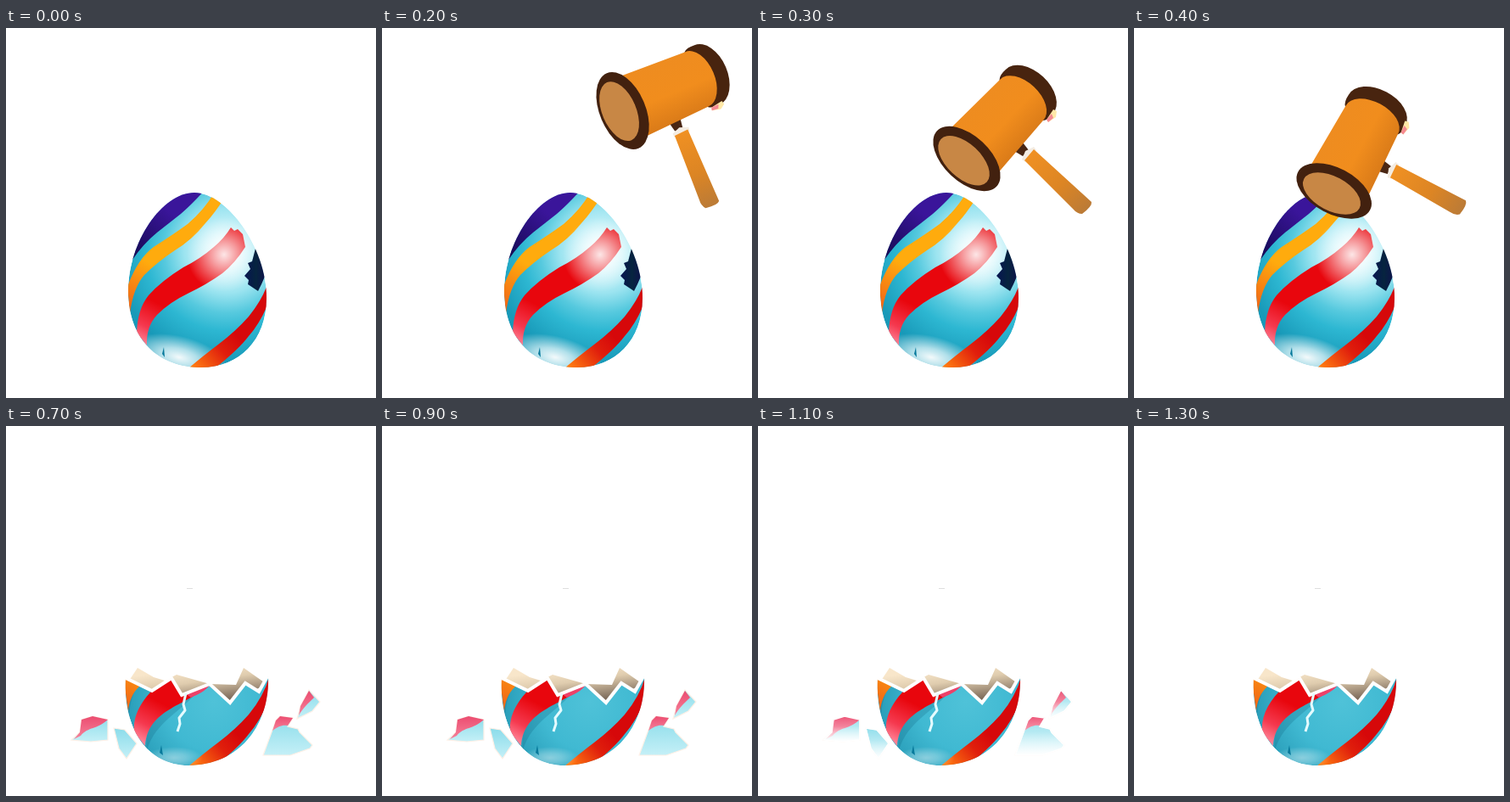
These frames come from a looping animation (436 px wide and 436 px high, 3.3 s). An HTML page:

```html
<!DOCTYPE html>
<html lang="en">
<head>
<meta charset="utf-8">
<title>Cracking egg</title>
<style>
html, body { margin: 0; width: 100%; height: 100%; overflow: hidden; background: #fff; }
svg { display: block; width: 100%; height: 100%; }
</style>
</head>
<body>
<svg viewBox="0 0 436 436">
<defs>
  <radialGradient id="aqua" gradientUnits="userSpaceOnUse" cx="260" cy="262" r="132">
    <stop offset="0" stop-color="#fff"/><stop offset=".18" stop-color="#cff4fa"/>
    <stop offset=".38" stop-color="#9ce4f0"/><stop offset=".56" stop-color="#56c9de"/>
    <stop offset=".72" stop-color="#2db7d2"/><stop offset="1" stop-color="#1899b8"/>
  </radialGradient>
  <radialGradient id="bowlAqua" gradientUnits="userSpaceOnUse" cx="245" cy="325" r="115">
    <stop offset="0" stop-color="#4fc2d8"/><stop offset=".5" stop-color="#40b9d2"/><stop offset="1" stop-color="#2396b2"/>
  </radialGradient>
  <radialGradient id="shine" gradientUnits="userSpaceOnUse" cx="257" cy="267" r="44">
    <stop offset="0" stop-color="#fff" stop-opacity=".9"/><stop offset=".35" stop-color="#fff" stop-opacity=".6"/>
    <stop offset="1" stop-color="#fff" stop-opacity="0"/>
  </radialGradient>
  <radialGradient id="glow">
    <stop offset="0" stop-color="#fff" stop-opacity=".95"/><stop offset=".4" stop-color="#f2fdff" stop-opacity=".7"/>
    <stop offset="1" stop-color="#fff" stop-opacity="0"/>
  </radialGradient>
  <linearGradient id="gold" gradientUnits="userSpaceOnUse" x1="146" y1="325" x2="174" y2="280">
    <stop offset="0" stop-color="#f26b16"/><stop offset="1" stop-color="#ffab0d"/>
  </linearGradient>
  <linearGradient id="band" gradientUnits="userSpaceOnUse" x1="222" y1="400" x2="270" y2="360">
    <stop offset="0" stop-color="#ff7a10"/><stop offset=".6" stop-color="#e01f0c"/><stop offset="1" stop-color="#d6080a"/>
  </linearGradient>
  <linearGradient id="red" gradientUnits="userSpaceOnUse" x1="158" y1="372" x2="182" y2="326">
    <stop offset="0" stop-color="#ff8699"/><stop offset=".4" stop-color="#f5394f"/><stop offset="1" stop-color="#e8060d"/>
  </linearGradient>
  <linearGradient id="purple" gradientUnits="userSpaceOnUse" x1="150" y1="268" x2="195" y2="218">
    <stop offset="0" stop-color="#160a55"/><stop offset="1" stop-color="#3a159a"/>
  </linearGradient>
  <linearGradient id="navy" x2="1">
    <stop offset="0" stop-color="#071552"/><stop offset=".5" stop-color="#06243f"/><stop offset="1" stop-color="#10104e"/>
  </linearGradient>
  <linearGradient id="inside" gradientUnits="userSpaceOnUse" x1="200" y1="288" x2="206" y2="330">
    <stop offset="0" stop-color="#f8e6ca"/><stop offset=".4" stop-color="#dfccae"/><stop offset="1" stop-color="#7b6959"/>
  </linearGradient>
  <linearGradient id="wood" x2="1">
    <stop offset="0" stop-color="#ee8c20"/><stop offset=".55" stop-color="#f18d1d"/><stop offset="1" stop-color="#d97a18"/>
  </linearGradient>
  <linearGradient id="handle" x2="1" y2="1">
    <stop offset="0" stop-color="#f39222"/><stop offset=".55" stop-color="#dc8524"/><stop offset="1" stop-color="#b5793a"/>
  </linearGradient>
  <linearGradient id="chip" x2="0" y2="1">
    <stop offset="0" stop-color="#8bdcea"/><stop offset="1" stop-color="#c5f0f7"/>
  </linearGradient>
  <linearGradient id="rose" x2="0" y2="1">
    <stop offset="0" stop-color="#ec4c70"/><stop offset="1" stop-color="#f5829b"/>
  </linearGradient>
  <linearGradient id="fade" x2="0" y2="1">
    <stop offset="0" stop-color="#fff" stop-opacity=".05"/><stop offset=".4" stop-color="#fff" stop-opacity=".2"/>
    <stop offset="1" stop-color="#fff"/>
  </linearGradient>
  <path id="eggShape" d="M222 194C260 194 307 258 307 318C307 368 275 400 230 400C180 400 144 368 144 310C144 252 184 194 222 194Z"/>
  <path id="bowlShape" d="M141 297L172 312L195 297L207 317L240 304L264 326L282 303L298 313L309 295C311 352 276 400 215 400C163 399 138 353 141 297Z"/>
  <path id="lowerBand" fill="url(#band)" d="M310 296Q304 318 286 340Q270 358 250 373Q234 385 215 401H246Q274 379 286 363Q300 347 309 324Z"/>
  <clipPath id="eggClip"><use href="#eggShape"/></clipPath>
  <clipPath id="bowlClip"><use href="#bowlShape"/></clipPath>
  <g id="chips">
    <path d="M77 370L87 361L89 346L102 342L120 346V370L100 372Z"/>
    <path d="M127 356L140 358L154 374L142 392L133 380Z"/>
    <path d="M303 388L318 347L323 342L338 344L332 354L344 357L346 361L361 376L358 380L335 388Z"/>
    <path d="M343 345L347 330L357 311L370 325L361 336Z"/>
  </g>
</defs>

<g id="egg" clip-path="url(#eggClip)">
  <use href="#eggShape" fill="url(#aqua)"/>
  <ellipse cx="204" cy="388" rx="58" ry="25" fill="url(#glow)" transform="rotate(14 204 388)"/>
  <path fill="url(#purple)" d="M148 190L235 190Q220 207 206 219Q192 230 178 241Q162 254 149 273Z"/>
  <path fill="url(#gold)" d="M246 193Q234 214 214 231Q196 244 174 258Q155 272 143 305L146 336Q150 306 163 291Q178 276 199 262Q219 250 235 230Q247 217 258 199Z"/>
  <path fill="url(#red)" d="M265 235L269 239L273 237L279 243L282 258Q270 277 255 289Q237 302 214 313Q193 323 178 338Q165 352 166 374L154 359Q155 331 168 315Q183 298 209 282Q229 272 245 258Q257 248 265 235Z"/>
  <use href="#lowerBand"/>
  <circle cx="257" cy="267" r="44" fill="url(#shine)"/>
  <path fill="url(#navy)" d="M296 252L290 275L285 277L288 284L281 292L286 297L285 302L297 310L301 302L308 286Z"/>
  <path fill="#087a9c" d="M186 376L187 388L184 384Z"/>
</g>

<g id="cracks" fill="none" stroke="#fff" stroke-linejoin="round" stroke-linecap="round">
  <path stroke-width="2.4" d="M222 195L227 204L222 212L220 223L215 229L219 241L213 250L207 262"/>
  <path fill="#fff" stroke-width="1" d="M205 264L212 268L219 276L226 286L237 295L230 300L224 308L220 322L215 333L209 343L208 353L206 363L204 353L206 342L212 331L215 321L219 309L224 298L218 289L215 279Z"/>
  <path stroke-width="1.5" d="M217 231L204 226L192 226L181 218L176 212L171 213M188 225L181 236L175 240L166 238M179 239L187 246L190 260L184 266L174 267L180 270L190 264M199 266L207 263M203 225L207 220"/>
</g>

<g id="bowl">
  <path fill="url(#inside)" d="M145 300L155 285L174 296L187 300L201 293L240 304L271 305L280 285L307 304L264 327L207 319L172 312Z"/>
  <g clip-path="url(#bowlClip)">
    <use href="#bowlShape" fill="url(#bowlAqua)"/>
    <path fill="#12667f" opacity=".25" d="M156 304C143 326 140 355 158 379L149 385L128 310ZM228 310C180 331 162 349 166 382C177 347 205 339 228 310Z"/>
    <path fill="url(#gold)" d="M138 294L158 306C148 315 145 326 144 336Z"/>
    <path fill="url(#red)" d="M180 304L195 294L207 317L243 302C215 330 167 332 164 377L151 361C149 340 161 321 180 304Z"/>
    <path fill="#ed4169" d="M211 315L243 302C234 314 226 316 218 320Z"/>
    <use href="#lowerBand"/>
    <ellipse cx="198" cy="391" rx="34" ry="13" fill="url(#glow)" opacity=".45"/>
    <path fill="#087a9c" d="M183 376L185 388L181 385Z"/>
  </g>
  <path fill="none" stroke="#fff" stroke-width="4" d="M141 297L172 312L195 297L207 317L240 304L264 326L282 303L298 313L308 295"/>
  <path fill="none" stroke="#e5fbff" stroke-width="3" stroke-linejoin="round" d="M212 315L209 328L211 335L204 344L205 351L202 360"/>
  <path stroke="#dedede" d="M213 191.5H220"/>
</g>

<g id="pieces">
  <use href="#chips" fill="url(#chip)" stroke="#fff0e6" stroke-width="1.2"/>
  <g fill="url(#rose)">
    <path d="M80 369L87 361L89 346L102 342L120 346C107 358 97 354 88 365Z"/>
    <path d="M314 359L318 347L323 342L338 344L332 353C325 352 321 354 314 359Z"/>
    <path d="M345 341L347 330L357 312L363 320C356 327 350 332 345 341Z"/>
  </g>
  <use id="fading" href="#chips" fill="url(#fade)" stroke="#fff" stroke-width="1.5"/>
</g>

<g id="hammer">
  <path fill="#4a2714" d="M302 145L312 135L319 144L312 151Z"/>
  <path fill="#f4ece2" d="M311 155L315 145L325 140L328 144L315 158Z"/>
  <path fill="url(#handle)" d="M325 143L393 205Q394 210 382 219Q376 219 371 213L314 156Z"/>
  <g transform="translate(246 154) rotate(43)">
    <path fill="#48240f" d="M-35 -94Q-39 -98 -38 -108A38 24 0 0 1 38 -108Q39 -98 35 -94Z"/>
    <path fill="url(#wood)" d="M-39 0L-35 -95A35 21 0 0 1 35 -95L39 0Z"/>
    <ellipse fill="#42210f" rx="48" ry="27"/>
    <ellipse fill="#c88745" cx="-1" cy="4" rx="37" ry="20"/>
  </g>
  <path fill="#ffe9a8" d="M340 108L348 96L352 98L351 105L342 111Z"/>
  <path fill="#f58a93" d="M340 108L346 101L348 106L342 111Z"/>
</g>
</svg>
<script>
const LOOP = 3300;
const part = id => document.getElementById(id);
const show = (id, visible) => { part(id).style.display = visible ? "" : "none"; };
const swings = [
  "translate(2 -5) rotate(24 385 212)",
  "",
  "rotate(-15 385 212)"
];

function draw(now) {
  const t = now % LOOP;
  const swinging = t >= 200 && t < 500;
  show("egg", t < 700);
  show("hammer", swinging);
  show("cracks", t >= 500 && t < 700);
  show("bowl", t >= 700);
  show("pieces", t >= 700 && t < 1300);
  show("fading", t >= 1100);
  if (swinging) part("hammer").setAttribute("transform", swings[Math.floor((t - 200) / 100)]);
}

let start;
function tick(now) {
  start ??= now;
  draw(now - start);
  requestAnimationFrame(tick);
}
draw(0);
requestAnimationFrame(tick);
</script>
</body>
</html>
```
